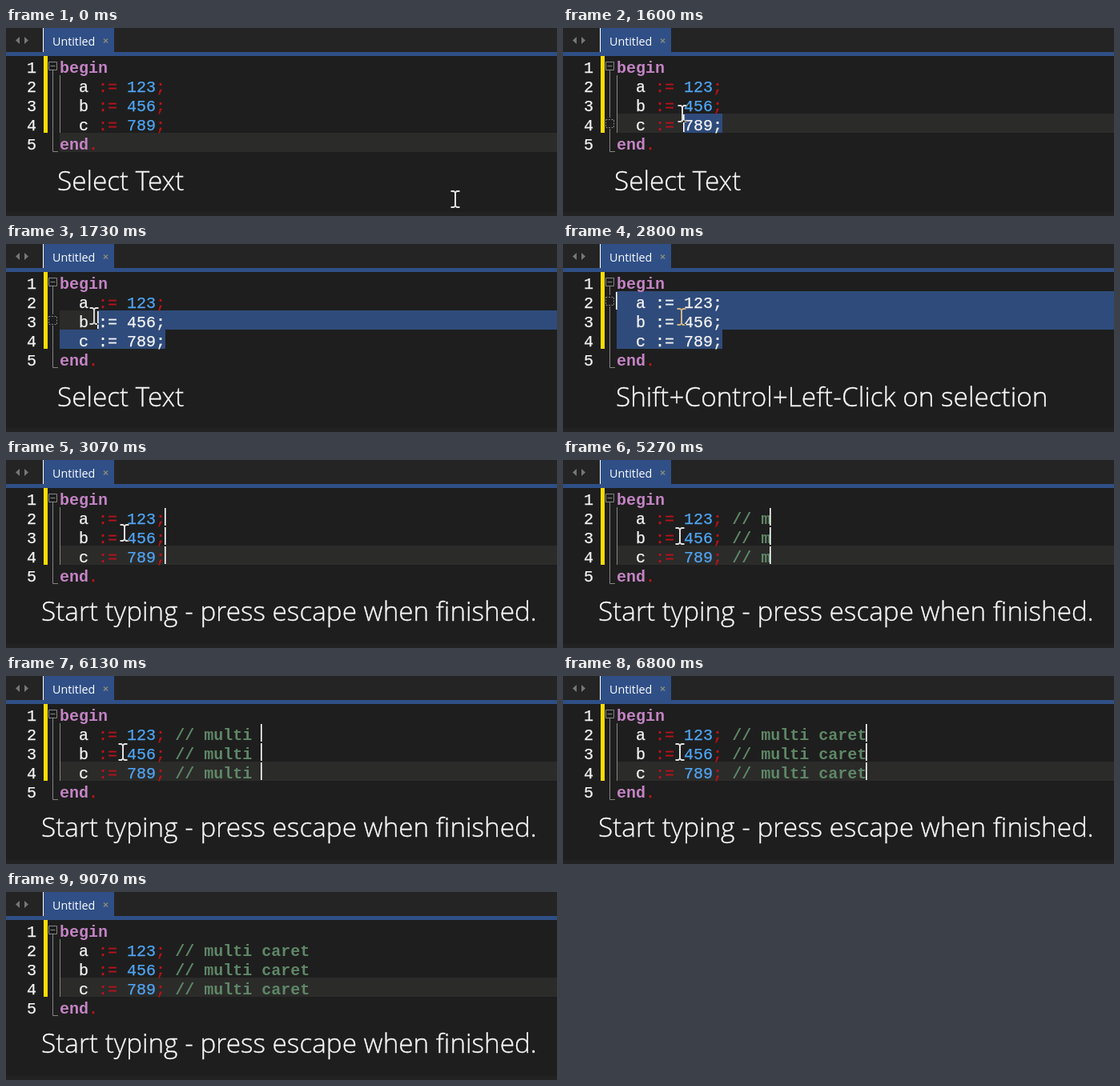
These frames come from a looping animation (688x235 px, 9270 ms). An HTML page:

```html
<!DOCTYPE html>
<html lang="en">
<head>
<meta charset="utf-8">
<title>Multi caret editing</title>
<style>
html, body { margin: 0; width: 100%; height: 100%; overflow: hidden; background: #1e1e1e; }
svg { display: block; width: 688px; height: 235px; }
text, tspan { fill: currentColor; stroke: currentColor; stroke-width: 0; }
.code { font: 20px "Liberation Mono", monospace; white-space: pre; color: #f4f4f4; }
.code, .code tspan { stroke-width: .25px; }
.code .key { color: #c383c3; font-weight: 700; stroke-width: 0; }
.code .num { color: #4fa5f3; }
.code .sym { color: #b9131a; }
.code .note { color: #5f8767; font-weight: 700; stroke-width: 0; }
.tab { font: 14.3px "Open Sans", sans-serif; color: #fff; }
.caption { font: 300 33.3px "Open Sans", sans-serif; color: #f8f8f8; stroke-width: .35px; }
.line { fill: none; stroke: #858585; }
#mouse { fill: none; stroke: #fff; stroke-width: 2; mix-blend-mode: difference; }
</style>
</head>
<body>
<svg id="stage" viewBox="0 0 688 235">
  <rect width="688" height="235" fill="#1e1e1e"/>
  <rect width="688" height="30" fill="#252424"/>
  <rect y="230" width="688" height="5" fill="#222"/>
  <rect x="47" width="88" height="31" fill="#2f4f86"/>
  <rect x="46" width="1" height="30" fill="#fff"/>
  <rect y="30" width="688" height="5" fill="#2f4f86"/>
  <path d="M17 11v9l-5-4.500zM23 11v9l5-4.500z" fill="#777"/>
  <text class="tab" x="58" y="22">Untitled</text>
  <path d="M122 13.500l5 5m0-5l-5 5" stroke="#8b8c7c" stroke-width="1.400"/>
  <rect id="band" x="67" width="621" height="24" fill="#2b2b2a"/>
  <g id="sel" fill="#2f4b7b"></g>
  <rect x="47" y="35" width="5" height="96" fill="#ffdc00"/>
  <path id="fold" class="line"/>
  <path id="guide" class="line" d="M67.500 59V131"/>
  <rect id="mark" class="line" x="53.500" width="10" height="10" stroke-dasharray="2 1.500"/>
  <g id="rows"></g>
  <g id="carets" fill="#fff"></g>
  <text id="caption" class="caption"></text>
  <path id="mouse" d="M-5.500-10H-2L0-8.500L2-10H5.500M0-9V9M-5.500 10H-2L0 8.500L2 10H5.500"/>
</svg>
<script>
const LEFT = 67, TOP = 35, CW = 12, RH = 24, BASE = 20.5;
const LOOP = 9270, RATE = 0.015;
const PRESS = 22, RELEASE = 28, SPLIT = 46, LEAVE = 136;
const $ = id => document.getElementById(id);
const SOURCE = ["begin", "  a := 123;", "  b := 456;", "  c := 789;", "end."];
const END = 11;

const TYPED = " // multi caret";
const KEYS = [62, 64, 66, 68, 79, 83, 84, 88, 90, 92, 95, 97, 98, 100, 102];
const BLINK = [[22, 34], [42, 54], [62, 76], [79, 109], [117, 125], [134, 136]];
const CAPTIONS = [
  [0, 64, 203, "Select Text"],
  [32, 66, 203, "Shift+Control+Left-Click on selection"],
  [SPLIT, 44, 201, "Start typing - press escape when finished."]
];
// tick, x, y
const PATH = [
  [0, 561, 213.5], [8, 218, 130], [9, 218, 130], [11, 214, 124], [12, 214, 124],
  [13, 208, 121], [21, 208, 121], [22, 200, 119], [23, 176, 114], [24, 149, 107],
  [28, 70, 73], [30, 70, 73], [35, 145, 91], [36, 148, 91], [50, 148, 91], [51, 146, 95]
];

function add(parent, tag, attrs, text) {
  const el = document.createElementNS("http://www.w3.org/2000/svg", tag);
  for (const k in attrs) el.setAttribute(k, attrs[k]);
  if (text) el.textContent = text;
  parent.append(el);
  return el;
}

function set(id, attrs) {
  for (const k in attrs) $(id).setAttribute(k, attrs[k]);
}

const rowY = r => TOP + r * RH;
const colX = c => LEFT + c * CW;
const show = (id, on) => $(id).style.visibility = on ? "visible" : "hidden";

const lines = SOURCE.map((_, r) => {
  add($("rows"), "text", { class: "code", x: 26, y: rowY(r) + BASE }, String(r + 1));
  return add($("rows"), "text", { class: "code", x: LEFT, y: rowY(r) + BASE });
});

function mouseAt(n) {
  const i = PATH.findIndex(p => p[0] > n);
  if (i < 0) return PATH[PATH.length - 1].slice(1);
  const [t0, x0, y0] = PATH[i - 1], [t1, x1, y1] = PATH[i];
  let k = (n - t0) / (t1 - t0);
  if (t1 - t0 > 3) k = k * k * (3 - 2 * k);
  return [x0 + (x1 - x0) * k, y0 + (y1 - y0) * k];
}

function selection(n) {
  if (n < PRESS || n >= SPLIT) return null;
  const [x, y] = mouseAt(Math.min(n, RELEASE));
  const col = Math.round((x - LEFT) / CW);
  return { row: Math.floor((y - TOP) / RH), col: Math.max(0, Math.min(END, col)) };
}

function selectedFrom(sel, r) {
  if (!sel || r < sel.row || r > 3) return Infinity;
  return r === sel.row ? sel.col : 0;
}

function kind(s) {
  if (s.startsWith("//")) return "note";
  if (/^(begin|end)$/.test(s)) return "key";
  if (/^\d/.test(s)) return "num";
  return /^[:;.\/]/.test(s) ? "sym" : "";
}

function drawLine(r, text, from) {
  lines[r].replaceChildren();
  let col = 0;
  for (const s of text.match(/\/\/.*|\w+|:=|\s+|./g)) {
    const cut = Math.max(0, Math.min(s.length, from - col));
    if (cut) add(lines[r], "tspan", { class: kind(s) }, s.slice(0, cut));
    if (cut < s.length) add(lines[r], "tspan", {}, s.slice(cut));
    col += s.length;
  }
}

function drawCaret(r, c) {
  add($("carets"), "rect", { x: colX(c) - 1, y: rowY(r) + 1, width: 1.6, height: 22 });
}

function draw(n) {
  const sel = selection(n);
  const typed = TYPED.slice(0, KEYS.filter(k => k <= n).length);
  const current = n < PRESS ? 4 : sel ? sel.row : 3;

  set("band", { y: rowY(current) });
  $("sel").replaceChildren();
  $("carets").replaceChildren();

  SOURCE.forEach((s, r) => {
    const from = selectedFrom(sel, r);
    drawLine(r, r > 0 && r < 4 ? s + typed : s, from);
    if (from < END) {
      const x = colX(from);
      add($("sel"), "rect", { x, y: rowY(r), width: (r < 3 ? 688 : colX(END)) - x, height: RH });
    }
  });

  if (BLINK.some(([a, b]) => n >= a && n < b)) {
    if (sel) drawCaret(sel.row, sel.col);
    else for (let r = 1; r < 4; r++) drawCaret(r, END + typed.length);
  }

  // Fold line, broken where the selection marker sits
  const active = sel && sel.col < END;
  const gap = active ? `V${rowY(sel.row) + 5}M58.5 ${rowY(sel.row) + 19}` : "";
  set("fold", { d: `M53.5 42.5h10v10h-10zM55.5 47.5h6M58.5 53${gap}V154.500H65` });
  show("mark", active);
  if (active) set("mark", { y: rowY(sel.row) + 7.5 });
  show("guide", !(sel && sel.row < 3));

  const [, x, y, text] = CAPTIONS.filter(c => c[0] <= n).pop();
  set("caption", { x, y });
  $("caption").textContent = text;

  const [mx, my] = mouseAt(n);
  set("mouse", { transform: `translate(${Math.round(mx)} ${Math.round(my)})` });
  show("mouse", n < LEAVE);
}

let last = -1;
const start = performance.now();
function tick(now) {
  const t = Math.max(0, now - start) % LOOP;
  const n = Math.floor(t * RATE + 0.06);
  if (n !== last) draw(last = n);
  requestAnimationFrame(tick);
}
draw(0);
requestAnimationFrame(tick);
</script>
</body>
</html>
```
